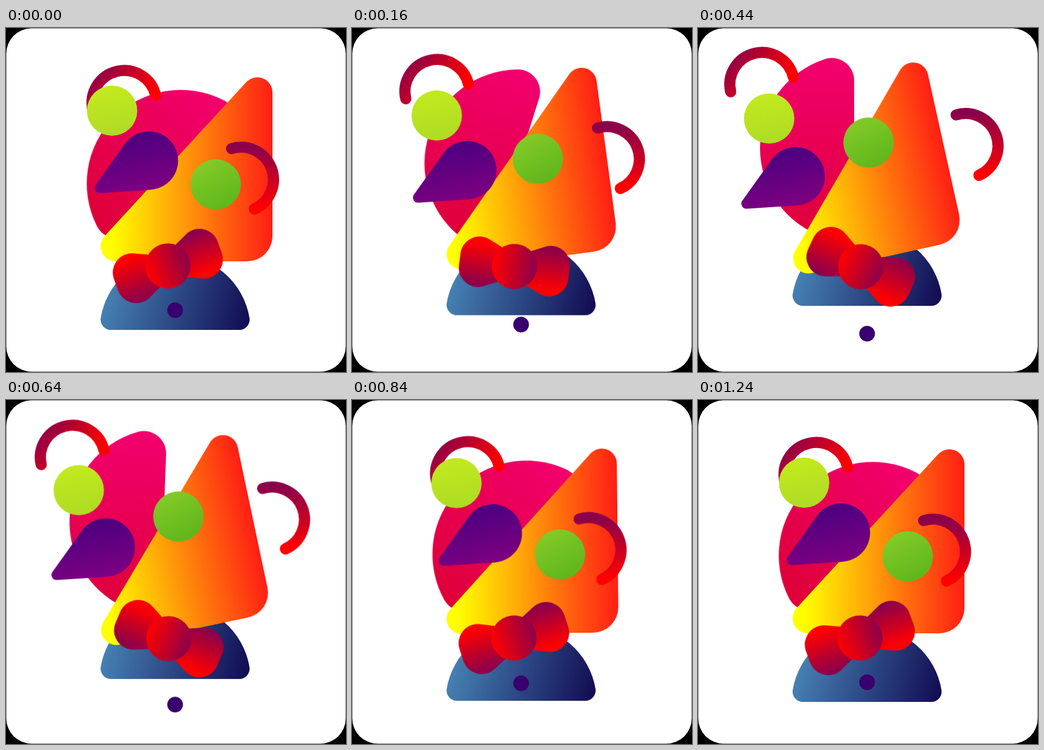
Animation of 564 by 572 pixels, one loop 1280 ms. Source, as an HTML page without scripts:

```html
<!DOCTYPE html>
<html lang="en">
<head>
<meta charset="utf-8">
<title>Geometric bear</title>
<style>
  html, body { margin: 0; width: 100%; height: 100%; overflow: hidden; background: #000; }
  svg { display: block; width: 564px; height: 572px; }

  .part {
    --x: 0px; --y: 0px; --turn: 0deg;
    animation: shift 1280ms infinite;
  }
  /* 300 ms out, hold, 300 ms back */
  @keyframes shift {
    0%, 4.3% { transform: none; animation-timing-function: ease; }
    27.7%, 48.6% {
      transform: translate(var(--x), var(--y)) rotate(var(--turn));
      animation-timing-function: ease;
    }
    72%, 100% { transform: none; }
  }

  .face { --x: -53.8px; --y: -3.8px; --turn: -45deg; transform-origin: 234.8px 203.8px; }
  .mask { --x: -29.5px; --y: -2.3px; --turn: -12.5deg; transform-origin: 299.5px 235px; }
  .bow { --x: 1.5px; --y: 1.3px; --turn: 45deg; transform-origin: 268.5px 395.7px; }
  .body { --y: -40px; }
  .button { --y: 39px; }
  .nose { --x: -75px; --y: 26px; }
  .eye-left { --x: -58px; --y: 13px; }
  .eye-right { --x: -65px; --y: -69.5px; }
  .ear-left { --x: -90px; --y: -30px; }
  .ear-right { --x: 54px; --y: -56px; }

  .ear { fill: none; stroke-width: 18.5; stroke-linecap: round; }
</style>
</head>
<body>
<svg viewBox="0 0 564 572">
  <defs>
    <linearGradient id="pink" x1="0" y1="0" x2="0" y2="1">
      <stop stop-color="#f2006e"/><stop offset="1" stop-color="#de0038"/>
    </linearGradient>
    <linearGradient id="fire">
      <stop stop-color="#ff0"/><stop offset=".06" stop-color="#ff0"/><stop offset="1" stop-color="#ff1e14"/>
    </linearGradient>
    <linearGradient id="navy" gradientUnits="userSpaceOnUse" x1="165" y1="440" x2="396" y2="502">
      <stop stop-color="#4682b4"/><stop offset="1" stop-color="#130e54"/>
    </linearGradient>
    <linearGradient id="plum" x1=".35" y1="0" x2=".65" y2="1">
      <stop stop-color="#470080"/><stop offset="1" stop-color="#800080"/>
    </linearGradient>
    <linearGradient id="lime" x1=".4" y1="0" x2=".6" y2="1">
      <stop stop-color="#c3ea1e"/><stop offset="1" stop-color="#aedb25"/>
    </linearGradient>
    <linearGradient id="leaf" x1=".2" y1="0" x2=".8" y2="1">
      <stop stop-color="#86cc28"/><stop offset="1" stop-color="#5cb41c"/>
    </linearGradient>
    <linearGradient id="wine">
      <stop stop-color="#f00"/><stop offset="1" stop-color="#8b004b"/>
    </linearGradient>
    <linearGradient id="wine-down" href="#wine" x1=".5" y1=".1" x2=".5" y2=".95"/>
    <linearGradient id="wine-left" href="#wine" x1="1" y1=".5" x2=".05" y2="0"/>
    <linearGradient id="wine-up" href="#wine" x1=".5" y1="1" x2=".5" y2="0"/>
    <path id="lobe" fill="url(#wine-down)"
      d="M-18-26L-46-39A32 32 0 0 0-91.5-10V10A32 32 0 0 0-46 39L-18 26Z"/>
  </defs>

  <rect x=".5" y=".5" width="563" height="571" rx="42" fill="#fff"/>

  <path class="part body" fill="url(#navy)"
    d="M174 502A17 17 0 0 1 157.1 482.3A125 125 0 0 1 403.9 482.3A17 17 0 0 1 387 502Z"/>
  <circle class="part button" cx="280.5" cy="469.3" r="13" fill="#38006e"/>

  <g class="part face">
    <path transform="translate(234.8 203.8) rotate(45)" fill="url(#pink)"
      d="M78-113A37 37 0 0 0 29.5-148.3A156 156 0 0 0 29.5 148.3A37 37 0 0 0 78 113Z"/>
  </g>
  <path class="part mask" fill="url(#fire)"
    d="M398.6 90.1A25 25 0 0 1 442 107V346A42 42 0 0 1 400 388H182A25 25 0 0 1 163.6 346.1Z"/>

  <path class="part ear ear-left" stroke="url(#wine-left)" d="M144.2 136A53.2 53.2 0 0 1 248.2 112"/>
  <path class="part ear ear-right" stroke="url(#wine-up)" d="M374.2 200.5A53.8 53.8 0 0 1 412 301"/>

  <path class="part nose" fill="url(#plum)"
    d="M156.1 274.5L240.2 268.9A48.5 48.5 0 1 0 197.5 192.4L148.6 261.1A8.5 8.5 0 0 0 156.1 274.5Z"/>
  <circle class="part eye-left" cx="176" cy="137.5" r="41.8" fill="url(#lime)"/>
  <circle class="part eye-right" cx="348" cy="260" r="41.8" fill="url(#leaf)"/>

  <g class="part bow">
    <g transform="translate(268.5 395.7) rotate(-20)">
      <use href="#lobe"/>
      <use href="#lobe" transform="rotate(180)"/>
      <circle r="37.5" fill="url(#wine)"/>
    </g>
  </g>
</svg>
</body>
</html>
```
